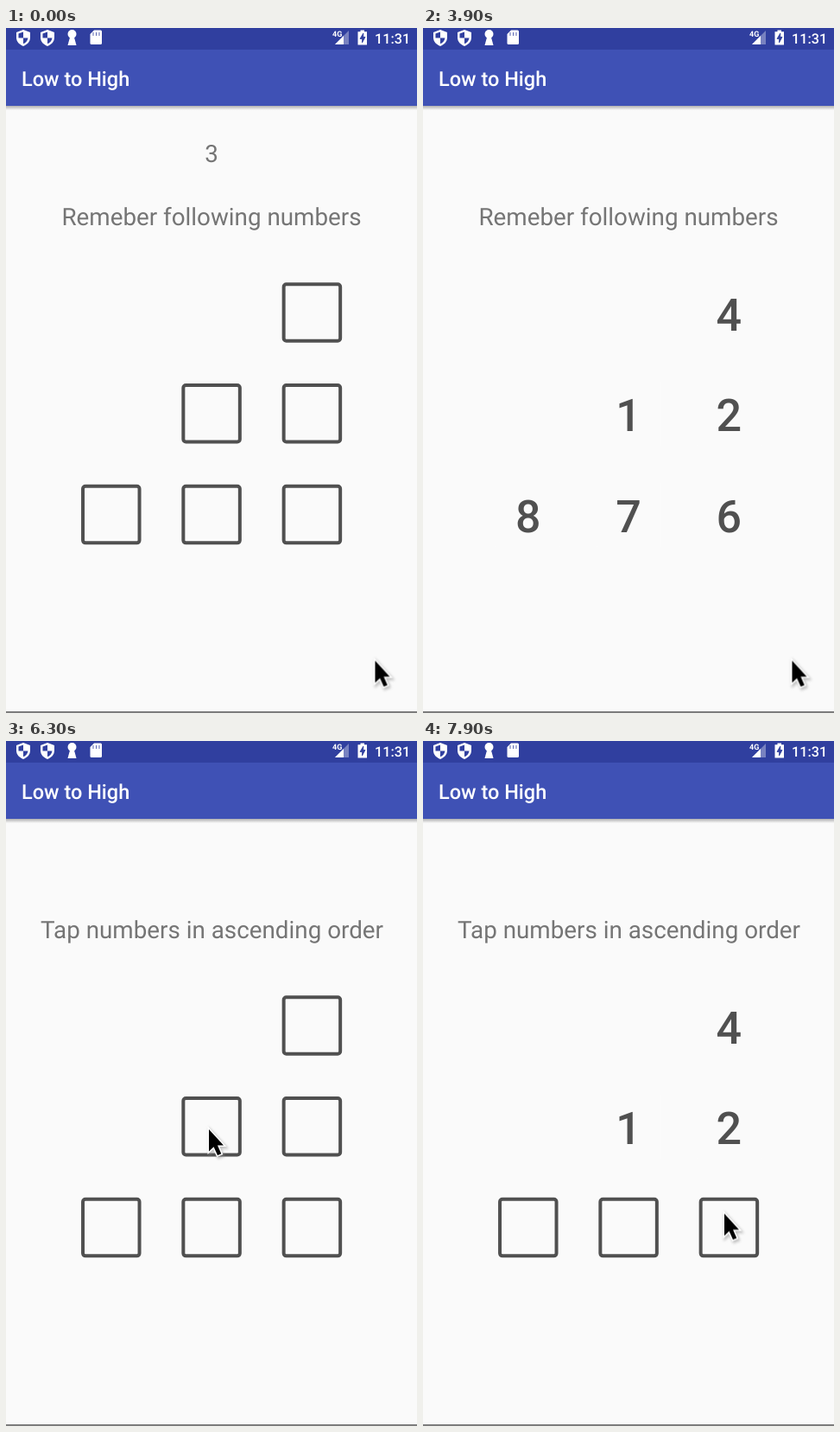
Write an HTML page that moves like this. It is 476 px wide and 792 px high and loops after 8 s.

```html
<!DOCTYPE html>
<html lang="en">
<head>
<meta charset="utf-8">
<title>Low to High</title>
<style>
  html, body { margin: 0; width: 100%; height: 100%; overflow: hidden; background: #fafafa; }
  svg { display: block; width: 476px; height: 792px; font-family: Roboto, sans-serif; text-rendering: geometricPrecision; }
  .label { font-size: 27.8px; fill: #757575; text-anchor: middle; }
  .digit { font-size: 52px; font-weight: 500; fill: #505050; text-anchor: middle; }
  .cover { fill: #fafafa; }
  .box { fill: none; stroke: #505050; stroke-width: 4; }

  /* Every part switches on one shared 8 s clock. */
  .step { animation: 8s step-end infinite; }
  .three { animation-name: three; }
  .two { animation-name: two; }
  .one { animation-name: one; }
  .memo { animation-name: memo; }
  .tap { animation-name: tap; }
  .peek { animation-name: peek; }
  .first { animation-name: first; }
  .second { animation-name: second; }
  .third { animation-name: third; }
  @keyframes three { 0% { opacity: 1 } 13.75%, 100% { opacity: 0 } }
  @keyframes two { 0%, 26.25%, 100% { opacity: 0 } 13.75% { opacity: 1 } }
  @keyframes one { 0%, 41.25%, 100% { opacity: 0 } 26.25% { opacity: 1 } }
  @keyframes memo { 0% { opacity: 1 } 67.5%, 100% { opacity: 0 } }
  @keyframes tap { 0% { opacity: 0 } 67.5%, 100% { opacity: 1 } }
  @keyframes peek { 0%, 67.5%, 100% { opacity: 0 } 41.25% { opacity: 1 } }
  @keyframes first { 0%, 67.5% { opacity: 0 } 41.25%, 80%, 100% { opacity: 1 } }
  @keyframes second { 0%, 67.5% { opacity: 0 } 41.25%, 87.5%, 100% { opacity: 1 } }
  @keyframes third { 0%, 67.5% { opacity: 0 } 41.25%, 93.75%, 100% { opacity: 1 } }

  .cursor { animation: move 8s ease-in-out infinite; }
  @keyframes move {
    0%, 65% { transform: translate(427.5px, 731.5px) }
    66.25% { transform: translate(429.5px, 721.5px); animation-timing-function: linear }
    71.25% { transform: translate(409.5px, 613.5px); animation-timing-function: ease-out }
    77.5%, 81.25% { transform: translate(235px, 449px) }
    86.25%, 88.1% { transform: translate(331.5px, 447.5px) }
    92.5%, 94.4% { transform: translate(348px, 333px) }
    98.75%, 100% { transform: translate(349px, 546.5px) }
  }
</style>
</head>
<body>
<svg viewBox="0 0 476 792">
  <defs>
    <linearGradient id="shade" x2="0" y2="1">
      <stop stop-color="#666" stop-opacity=".5"/>
      <stop offset="1" stop-color="#666" stop-opacity="0"/>
    </linearGradient>
    <filter id="blur" x="-50%" y="-50%" width="200%" height="200%">
      <feGaussianBlur stdDeviation="1.6"/>
    </filter>
    <g id="shield">
      <path d="M0-9 8-6V0C8 5 4.500 8 0 10-4.500 8-8 5-8 0V-6Z" fill="#fff"/>
      <path d="M0-6.500V0.500H5.500C5 4 3 6 0 7.300V0.500H-5.500V-4.500Z" fill="#303f9f"/>
    </g>
    <rect id="square" class="box" x="-32.750" y="-32.750" width="65.500" height="65.500" rx="3"/>
    <rect id="cover" class="cover" x="-37" y="-37" width="74" height="74"/>
    <path id="arrow" d="M0 0V25.500L5.600 20.300 10 30 14.300 28.200 10 18.600H17Z"/>
  </defs>

  <!-- status bar -->
  <rect width="476" height="25" fill="#303f9f"/>
  <use href="#shield" x="20" y="11"/>
  <use href="#shield" x="48" y="11"/>
  <g fill="#fff">
    <circle cx="76.500" cy="7" r="5"/>
    <path d="M74.500 9H78.500L81.500 20H71.500Z"/>
    <path d="M102 2.500H109.500Q111 2.500 111 4V17.500Q111 19 109.500 19H99Q97.500 19 97.500 17.500V7Z"/>
    <path d="M397 3V19H381Z" opacity=".35"/>
    <path d="M391 9V19H381Z"/>
    <path d="M410.500 2.500H415V4.200H418V19.500H407.500V4.200H410.500Z"/>
    <text x="378" y="10" font-size="9" font-weight="700">4G</text>
    <text x="427" y="17.500" font-size="16.200" font-weight="500">11:31</text>
  </g>
  <path d="M101 5V9M104.500 5V9M108 5V9M413.800 6 410 12.500H412.500V17L416 10.500H413.800Z" fill="#303f9f" stroke="#303f9f" stroke-width=".8"/>

  <!-- app bar -->
  <rect y="25" width="476" height="65" fill="#3f51b5"/>
  <rect y="90" width="476" height="5" fill="url(#shade)"/>
  <text x="18" y="66.500" font-size="23.500" font-weight="500" fill="#fff">Low to High</text>

  <g class="label">
    <text class="step three" x="238" y="155">3</text>
    <text class="step two" x="238" y="155">2</text>
    <text class="step one" x="238" y="155">1</text>
    <text class="step memo" x="238" y="228">Remeber following numbers</text>
    <text class="step tap" x="238.500" y="228">Tap numbers in ascending order</text>
  </g>

  <g id="cells"></g>

  <rect y="790" width="476" height="2" fill="#7c7c7c"/>

  <g class="cursor">
    <use href="#arrow" x="1.500" y="2" fill="#888" stroke="#888" stroke-width="4" opacity=".5" filter="url(#blur)"/>
    <use href="#arrow" fill="#000" stroke="#fff" stroke-width="3"/>
    <use href="#arrow" fill="#000"/>
  </g>
</svg>
<script>
  // column, row, digit, timing class
  const cells = [
    [2, 0, 4, 'third'],
    [1, 1, 1, 'first'], [2, 1, 2, 'second'],
    [0, 2, 8, 'peek'], [1, 2, 7, 'peek'], [2, 2, 6, 'peek']
  ];
  document.getElementById('cells').innerHTML = cells.map(([col, row, digit, timing]) => `
    <g transform="translate(${121.8 + col * 116.3} ${329 + row * 116.8})">
      <use href="#square"/>
      <g class="step ${timing}">
        <use href="#cover"/>
        <text class="digit" y="20.5">${digit}</text>
      </g>
    </g>`).join('');
</script>
</body>
</html>
```
